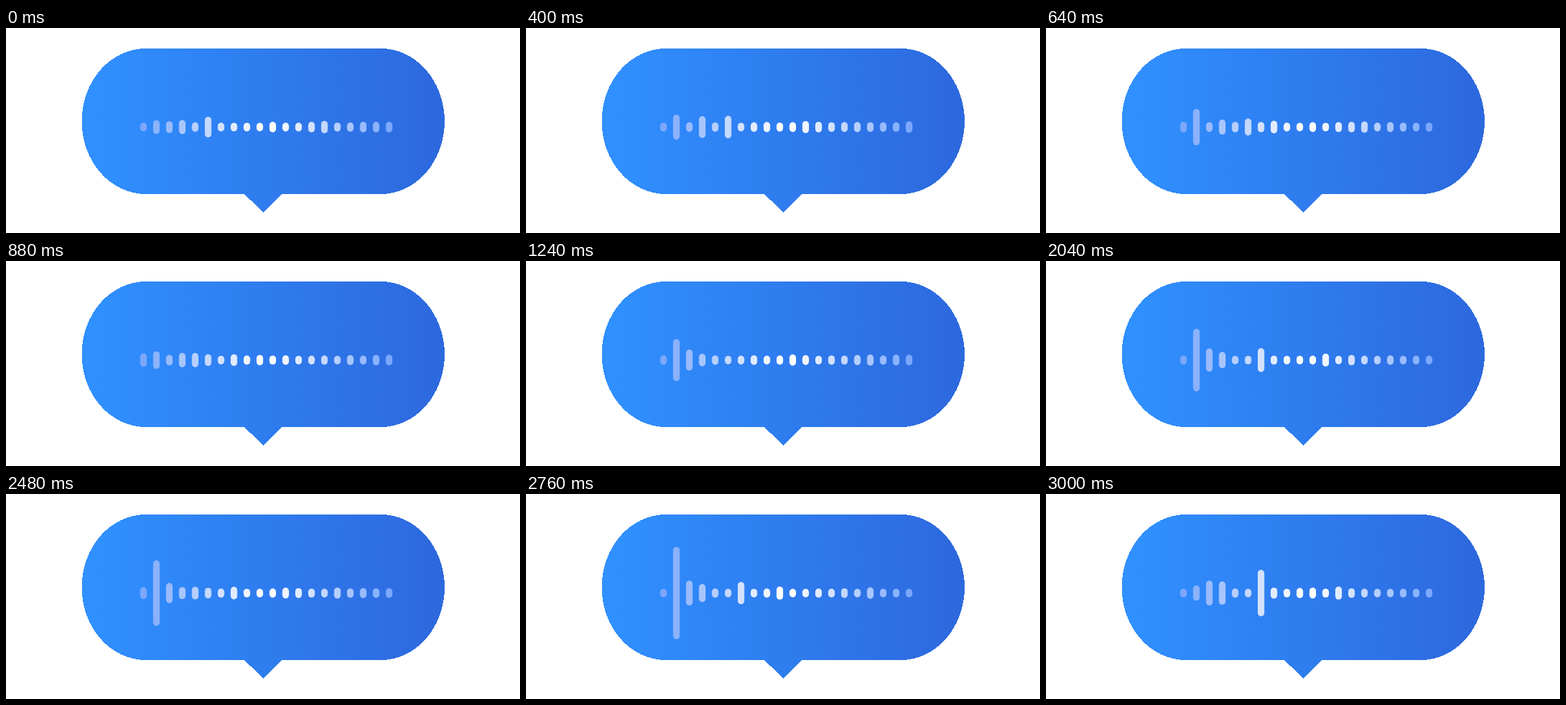
An HTML page that plays this animation: 750x300 px, repeating every 3.04 s.

```html
<!DOCTYPE html>
<html lang="en">
<head>
<meta charset="utf-8">
<title>Voice bubble</title>
<style>
  html, body { margin: 0; width: 100%; height: 100%; overflow: hidden; background: #fff; }
  svg { display: block; width: 750px; height: 300px; }
  #bars { filter: blur(.7px); }
</style>
</head>
<body>
<svg viewBox="0 0 750 300">
  <defs>
    <linearGradient id="blue" gradientUnits="userSpaceOnUse" x1="125" y1="0" x2="625" y2="0">
      <stop offset="0" stop-color="#3090ff"/>
      <stop offset="1" stop-color="#2d69de"/>
    </linearGradient>
  </defs>
  <path fill="url(#blue)" shape-rendering="crispEdges"
    d="M204 30H547A93 106.5 0 0 1 547 243H402L375.5 269.5L347.5 243H204A93.500 106.500 0 0 1 204 30Z"/>
  <g id="bars"></g>
</svg>
<script>
const LOOP = 3040, STEP = 40, COUNT = 20;
const MID_Y = 145, FIRST_X = 200.6, GAP = 18.86, WIDTH = 9.6, MIN = 12;

// Loud moments of the voice; rise and fall in ms.
const pulses = [
  { bar: 1, at: 260, height: 56, rise: 320, fall: 320 },
  { bar: 1, at: 680, height: 60, rise: 280, fall: 280 },
  { bar: 1, at: 1580, height: 138, rise: 560, fall: 1250 },
  { bar: 1, at: 2780, height: 138, rise: 900, fall: 240 },
  { bar: 2, at: 1600, height: 80, rise: 500, fall: 650 },
  { bar: 2, at: 2900, height: 40, rise: 1100, fall: 800 },
  { bar: 3, at: 400, height: 32, rise: 400, fall: 480 },
  { bar: 3, at: 1600, height: 33, rise: 500, fall: 1000 },
  { bar: 3, at: 3000, height: 34, rise: 700, fall: 400 },
  { bar: 5, at: 240, height: 38, rise: 800, fall: 800 },
  { bar: 6, at: 2040, height: 35, rise: 300, fall: 400 },
  { bar: 6, at: 3000, height: 68, rise: 380, fall: 400 }
];

const mix = (a, b, u) => a + (b - a) * u;

function random(a, b) {
  const n = Math.sin(a * 127.1 + b * 311.7) * 43758.5453;
  return n - Math.floor(n);
}

// Low murmur, a little louder at the bass end.
function murmur(i, time) {
  const beat = time / 120, cell = Math.floor(beat);
  const level = k => random(i + 1, k) ** 3;
  const size = mix(14, 7, Math.min(1, i / 8));
  return MIN + 0.5 + size * mix(level(cell), level(cell + 1), beat - cell);
}

function swell({ at, height, rise, fall }, time) {
  const gap = time < at ? (at - time) / rise : (time - at) / fall;
  return mix(height, MIN, Math.min(1, gap));
}

function heightAt(i, time) {
  const loud = pulses.filter(p => p.bar === i).map(p => swell(p, time));
  return Math.max(murmur(i, time), ...loud);
}

// Pale blue at both ends, white in the middle.
function tint(i) {
  const u = Math.min(i, COUNT - 1 - i) / (COUNT / 2 - 1);
  return `rgb(${mix(124, 255, u)}, ${mix(168, 255, u)}, ${mix(252, 255, u)})`;
}

const group = document.getElementById('bars');
const bars = Array.from({ length: COUNT }, (_, i) => {
  const bar = document.createElementNS('http://www.w3.org/2000/svg', 'rect');
  bar.setAttribute('x', FIRST_X + i * GAP - WIDTH / 2);
  bar.setAttribute('width', WIDTH);
  bar.setAttribute('rx', WIDTH / 2);
  bar.setAttribute('fill', tint(i));
  return group.appendChild(bar);
});

function draw() {
  const time = Math.floor((performance.now() % LOOP) / STEP) * STEP;
  bars.forEach((bar, i) => {
    const h = heightAt(i, time);
    bar.setAttribute('y', MID_Y - h / 2);
    bar.setAttribute('height', h);
  });
  requestAnimationFrame(draw);
}
draw();
</script>
</body>
</html>
```
